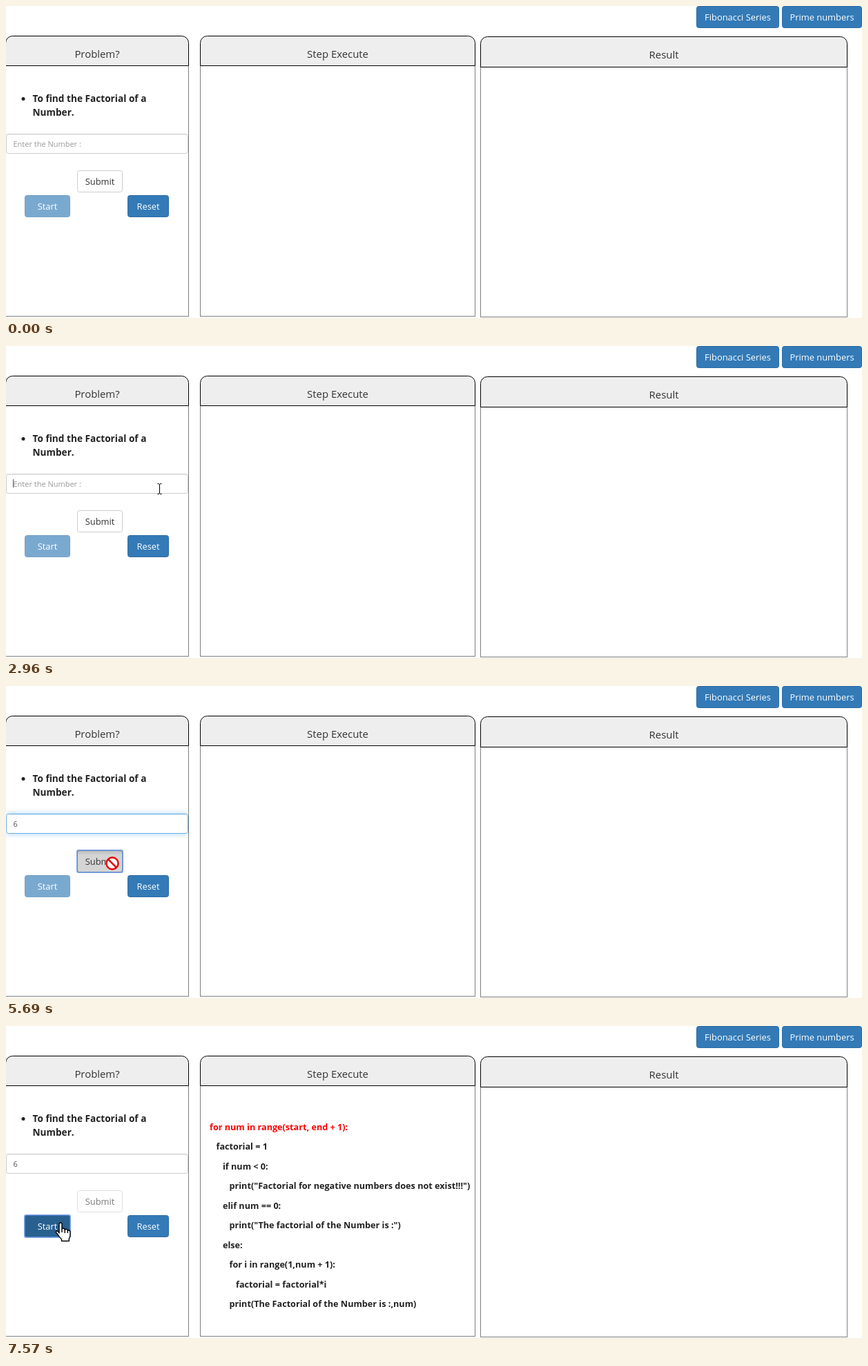
An HTML page with a canvas for the animation above (8 s loop, 1240x452 px).

```html
<!DOCTYPE html>
<html lang="en">
<head>
<meta charset="utf-8">
<title>Factorial steps</title>
<style>
  html, body { margin: 0; width: 100%; height: 100%; overflow: hidden; background: #fff; }
  canvas { display: block; }
</style>
</head>
<body>
<canvas id="stage" width="1240" height="452"></canvas>
<script>
const ctx = document.getElementById('stage').getContext('2d');
const LOOP = 8000;
const FAMILY = '"Open Sans", "Noto Sans", sans-serif';

const CODE = [
  [0, 'for num in range(start, end + 1):'],
  [1, 'factorial = 1'],
  [2, 'if num < 0:'],
  [3, 'print("Factorial for negative numbers does not exist!!!")'],
  [2, 'elif num == 0:'],
  [3, 'print("The factorial of the Number is :")'],
  [2, 'else:'],
  [3, 'for i in range(1,num + 1):'],
  [4, 'factorial = factorial*i'],
  [3, 'print(The Factorial of the Number is :,num)']
];

const INPUT = { x: 0, y: 185, w: 264, h: 29 };
const SUBMIT = { x: 103, y: 238, w: 66, h: 32 };
const START = { x: 27, y: 274, w: 66, h: 32 };
const RESET = { x: 176, y: 274, w: 60, h: 32 };
const BLUE = { fill: '#337ab7', line: '#2e6da4', ink: '#fff' };
const DARK = { fill: '#286090', line: '#204d74', ink: '#fff' };
const WHITE = { fill: '#fff', line: '#ccc', ink: '#333' };
const HOVER = { fill: '#e6e6e6', line: '#adadad', ink: '#333' };
const PRESSED = { fill: '#d4d4d4', line: '#8c8c8c', ink: '#333' };

// Pointer moves: first step, last step, number of steps, end point
const MOVES = [
  [550, 640, 3, 795, 318],
  [840, 1080, 4, 501, 260],
  [1330, 1330, 1, 435, 256],
  [1405, 1480, 2, 265, 225],
  [1710, 2030, 5, 222, 206],
  [2490, 2490, 1, 222, 207],
  [4900, 5370, 7, 154, 257],
  [6310, 6390, 2, 135, 261],
  [6600, 6600, 1, 109.5, 269],
  [6640, 6950, 5, 79, 285]
];

const ARROW = new Path2D('M.5.5V19.5L5 15.3L8.5 23L11.5 21.7L8.3 14.3H14.5Z');
const HAND = new Path2D('M-2 15V2.2Q-2 0 0 0T2 2.2V9.5Q2.3 8 4 8T6.3 10.5Q6.6 9 8.2 9.2T10.4 11.7' +
  'Q10.8 10.5 12.2 10.8T14 13.5V18Q14 21 12.3 23V26.5H1.5V24Q-1.5 21-3 18.5T-6.6 14Q-6.8 12-5 12T-2 15Z');
const KNUCKLES = new Path2D('M2 9.5V14M6.3 10.5V15M10.4 11.7V15');
const BEAM = new Path2D('M-2.5-7.5H-1L.5-6.5L2-7.5H3.5M.5-6.5V6.5M-2.5 7.5H-1L.5 6.5L2 7.5H3.5');

const within = (t, a, b) => t >= a && t < b;
const inside = (p, r) => p.x >= r.x && p.x < r.x + r.w && p.y >= r.y && p.y < r.y + r.h;

function text(str, x, y, size, color, weight = 400, align = 'left') {
  ctx.font = `${weight} ${size}px ${FAMILY}`;
  ctx.textAlign = align;
  ctx.fillStyle = color;
  ctx.fillText(str, x, y);
}

function box(r, radius, fill, line) {
  ctx.beginPath();
  ctx.roundRect(r.x + .5, r.y + .5, r.w - 1, r.h - 1, radius);
  ctx.fillStyle = fill;
  ctx.fill();
  ctx.strokeStyle = line;
  ctx.lineWidth = 1;
  ctx.stroke();
}

function button(label, r, look, enabled = true, focused = false) {
  box(r, 3, look.fill, look.line);
  if (look === PRESSED) {
    const shade = ctx.createLinearGradient(0, r.y, 0, r.y + 7);
    shade.addColorStop(0, 'rgba(0,0,0,.13)');
    shade.addColorStop(1, 'rgba(0,0,0,0)');
    ctx.fillStyle = shade;
    ctx.fillRect(r.x + 1, r.y + 1, r.w - 2, 7);
  }
  if (focused) {
    ctx.strokeStyle = 'rgba(94,143,220,.8)';
    ctx.lineWidth = 2;
    ctx.beginPath();
    ctx.roundRect(r.x, r.y, r.w, r.h, 2);
    ctx.stroke();
  }
  text(label, r.x + r.w / 2, r.y + 20.5, 12.9, look.ink, 500, 'center');
  if (!enabled) {
    ctx.fillStyle = 'rgba(255,255,255,.35)';
    ctx.fillRect(r.x, r.y, r.w, r.h);
  }
}

function panel(title, x, y, w, head, bottom) {
  ctx.lineWidth = 1;
  ctx.strokeStyle = '#808080';
  ctx.strokeRect(x + .5, y + head + .5, w - 1, bottom - y - head);
  box({ x, y, w, h: head + 1 }, [10, 10, 0, 0], '#eee', '#000');
  text(title, x + w / 2, y + 31.5, 14.9, '#333', 400, 'center');
}

function input(t) {
  const focused = within(t, 3190, 5760);
  ctx.save();
  ctx.beginPath();
  ctx.rect(0, 170, 264, 60);
  ctx.clip();
  if (focused) {
    ctx.shadowColor = 'rgba(102,175,233,.6)';
    ctx.shadowBlur = 8;
    ctx.fillStyle = '#fff';
    ctx.beginPath();
    ctx.roundRect(INPUT.x, INPUT.y, INPUT.w, INPUT.h, 3);
    ctx.fill();
    ctx.shadowColor = 'transparent';
  }
  box(INPUT, 3, '#fff', focused ? '#66afe9' : '#ccc');
  ctx.fillStyle = 'rgba(0,0,0,.06)';
  ctx.fillRect(2, 186, 260, 1);
  ctx.restore();

  const typed = t >= 4510;
  text(typed ? '6' : 'Enter the Number :', 10.5, 203.5, 11, typed ? '#555' : '#999', 500);
  const caret = within(t, 2960, 3420) || within(t, 3970, 5040);
  if (caret) {
    ctx.fillStyle = '#555';
    ctx.fillRect(typed ? 17 : 10, 193, 1, 12);
  }
}

function pointerAt(t) {
  if (t < MOVES[0][0]) return null;
  let x = 1100, y = 436;
  for (const [from, to, steps, endX, endY] of MOVES) {
    if (t < from) break;
    const gap = steps > 1 ? (to - from) / (steps - 1) : 1;
    const k = Math.min(steps, Math.floor((t - from) / gap + 1e-6) + 1) / steps;
    x += (endX - x) * k;
    y += (endY - y) * k;
  }
  return { x: Math.round(x), y: Math.round(y) };
}

function drawBlocked() {
  ctx.fillStyle = '#fff';
  ctx.beginPath();
  ctx.arc(0, 0, 10.3, 0, 7);
  ctx.fill();
  ctx.strokeStyle = '#e00b0b';
  ctx.lineWidth = 2.6;
  ctx.beginPath();
  ctx.arc(0, 0, 8.6, 0, 2 * Math.PI);
  ctx.moveTo(-6, -6);
  ctx.lineTo(6, 6);
  ctx.stroke();
}

function pointer(p, t) {
  if (within(t, 2180, 2290) || within(t, 5520, 5610) || within(t, 7330, 7410)) {
    ctx.fillStyle = 'rgba(255,255,0,.6)';
    ctx.beginPath();
    ctx.arc(p.x - 1.5, p.y - .5, 11.5, 0, 7);
    ctx.fill();
  }
  ctx.save();
  ctx.translate(p.x, p.y);
  ctx.lineWidth = 1;
  ctx.lineJoin = 'round';
  ctx.strokeStyle = '#000';
  ctx.fillStyle = '#fff';
  if (inside(p, INPUT)) {
    ctx.stroke(BEAM);
  } else if (inside(p, SUBMIT) && t >= 5690) {
    drawBlocked();
  } else if (inside(p, SUBMIT) || inside(p, START)) {
    ctx.lineWidth = 1.4;
    ctx.fill(HAND);
    ctx.stroke(HAND);
    ctx.stroke(KNUCKLES);
  } else {
    ctx.fill(ARROW);
    ctx.stroke(ARROW);
  }
  ctx.restore();
}

function draw(t) {
  const p = pointerAt(t);
  const ready = t >= 5760;
  ctx.fillStyle = '#fff';
  ctx.fillRect(0, 0, 1240, 452);

  button('Fibonacci Series', { x: 1000, y: 0, w: 120, h: 32 }, BLUE);
  button('Prime numbers', { x: 1124, y: 0, w: 116, h: 32 }, BLUE);
  panel('Problem?', -1, 43, 266, 43, 449);
  panel('Step Execute', 281, 43, 399, 43, 449);
  panel('Result', 687, 44, 532, 44, 450);

  ctx.fillStyle = '#222';
  ctx.beginPath();
  ctx.arc(25, 134.5, 2.5, 0, 7);
  ctx.fill();
  text('To find the Factorial of a', 38.5, 138.5, 13.65, '#222', 700);
  text('Number.', 38.5, 158.5, 13.65, '#222', 700);
  input(t);

  const pressed = within(t, 5520, 5760);
  const hovered = p && !ready && inside(p, SUBMIT);
  button('Submit', SUBMIT, pressed ? PRESSED : hovered ? HOVER : WHITE, !ready, pressed);
  const overStart = p && ready && inside(p, START);
  button('Start', START, overStart ? DARK : BLUE, ready, t >= 7330);
  button('Reset', RESET, BLUE);

  if (ready) {
    CODE.forEach(([depth, line], i) => {
      const color = i === 0 && t >= 7490 ? '#f00' : '#222';
      text(line, 295 + depth * 9.5, 150.8 + i * 28.5, 12.65, color, 700);
    });
  }
  if (p) pointer(p, t);
}

function tick() {
  draw(performance.now() % LOOP);
  requestAnimationFrame(tick);
}
tick();
</script>
</body>
</html>
```
